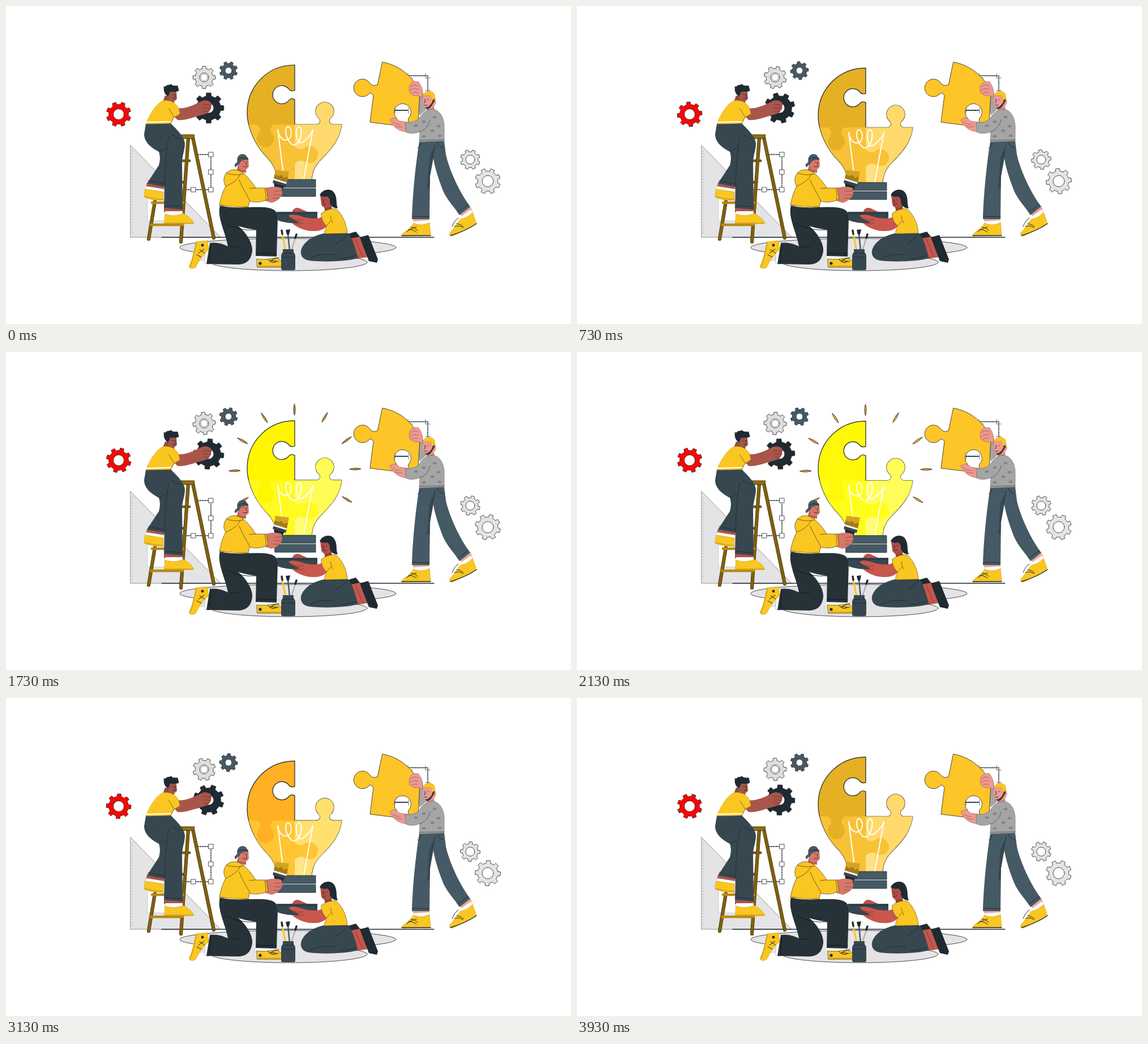
Recreate the animation shown at these times as an HTML page with a canvas. Size 998 by 561 pixels, loop 4 s.

```html
<!DOCTYPE html>
<html lang="en">
<head>
<meta charset="utf-8">
<title>Building an idea</title>
<style>
html, body { margin: 0; width: 100%; height: 100%; overflow: hidden; background: #fff; }
canvas { display: block; width: 100%; height: 100%; }
</style>
</head>
<body>
<canvas id="stage" width="998" height="561"></canvas>
<script>
const W = 998, H = 561, LOOP = 4000, STEP = 1000 / 15;
const stage = document.getElementById('stage').getContext('2d');
let g = stage;

const YELLOW = '#fac621', SHADE = '#d9a61c', DARK = '#37474f', SLATE = '#455a64',
  INK = '#1f2a32', NAVY = '#263238', LINE = '#222', WHITE = '#fff', PALE = '#e4e4e6';

function fill(d, color, edge, width = 0.8) {
  const p = new Path2D(d);
  g.fillStyle = color;
  g.fill(p);
  if (edge) { g.strokeStyle = edge; g.lineWidth = width; g.stroke(p); }
}

function line(d, color = LINE, width = 1, dash = []) {
  g.strokeStyle = color;
  g.lineWidth = width;
  g.setLineDash(dash);
  g.stroke(new Path2D(d));
  g.setLineDash([]);
}

function oval(x, y, rx, ry, color, edge) {
  g.beginPath();
  g.ellipse(x, y, rx, ry, 0, 0, Math.PI * 2);
  g.fillStyle = color;
  g.fill();
  if (edge) { g.strokeStyle = edge; g.lineWidth = 0.8; g.stroke(); }
}

function box(x, y, w, h, color, edge) {
  fill(`M${x} ${y}h${w}v${h}h${-w}Z`, color, edge);
}

function layer(draw) {
  const c = document.createElement('canvas');
  c.width = W;
  c.height = H;
  g = c.getContext('2d');
  g.lineCap = g.lineJoin = 'round';
  draw();
  g = stage;
  return c;
}

function gear(x, y, r, hole, color, angle) {
  const teeth = 8, root = r * 0.79, step = Math.PI * 2 / teeth;
  g.beginPath();
  for (let i = 0; i < teeth; i++) {
    const a = angle + i * step - Math.PI / 2;
    for (const [k, rad] of [[-0.28, root], [-0.19, r], [0.19, r], [0.28, root]]) {
      g.lineTo(x + Math.cos(a + k * step) * rad, y + Math.sin(a + k * step) * rad);
    }
    g.arc(x, y, root, a + 0.28 * step, a + 0.72 * step);
  }
  g.closePath();
  g.moveTo(x + hole, y);
  g.arc(x, y, hole, 0, Math.PI * 2);
  g.fillStyle = color;
  g.fill('evenodd');
  g.strokeStyle = LINE;
  g.lineWidth = 0.8;
  g.stroke();
}

function scenery() {
  oval(498, 426, 191, 16, PALE, LINE);
  oval(500, 452, 138, 15, PALE, LINE);
  box(340, 430, 270, 20, PALE);

  // set square
  fill('M220 246L379 408H220Z', PALE, '#555', 0.6);
  fill('M250 316V379H312Z', WHITE, '#aaa', 0.5);
  for (let y = 256; y < 406; y += 5) line(`M221 ${y}h3`, '#aaa', 0.6);
  line('M275 408H756', INK, 1.3);

  // selection frames
  line('M338 262H362V324H300', INK, 1.4, [2.5, 1.8]);
  for (const [x, y] of [[362, 262], [362, 293], [362, 324], [331, 324]]) box(x - 4, y - 4, 8, 8, WHITE, LINE);
  line('M712 123H745V153', INK, 1.4, [2, 1.6]);
  line('M710 119V127H718M741 119V127H749M741 149H749', '#666', 1);
}

function ladder() {
  const leg = (d, w) => { line(d, '#3b2c08', w + 1.2); line(d, '#80600f', w); };
  leg('M330 232L367 409', 5);
  leg('M308 273H324M306 311H317', 3.5);
  leg('M322 232L309 416', 5);
  leg('M263 345L252 411', 5);
  line('M258 347H313M256 386H312', '#b58916', 4.5);
  fill('M300 227H333L331 234H302Z', '#926d12', '#3b2c08');
}

function climber() {
  fill('M249 312L280 318L279 326L247 321Z', '#a9554a');
  fill('M248 318L279 323L278 331L246 325Z', WHITE);
  fill('M246 323L278 328L277 343C264 343 252 341 244 337Z', YELLOW, SHADE);
  line('M245 336Q260 341 277 341', SHADE, 2);
  fill('M279 356H312V364H279Z', '#a9554a');
  fill('M281 362H312V369H281Z', WHITE);
  fill('M281 367C293 372 306 369 313 366C322 371 331 377 331 384H280Z', YELLOW, SHADE);
  line('M280 383H331', SHADE, 2);
  fill('M247 208L291 207C300 216 316 231 316 243C316 254 311 264 311 277L312 359L279 356L280 319L249 313L270 281C273 270 272 264 270 257C256 250 244 240 244 226Z', DARK);
  line('M288 230C283 250 281 285 280 318M270 257L285 250M251 308L280 314M280 352L311 354M292 226Q302 232 309 234', INK, 0.8);

  fill('M302 180C315 182 330 176 345 168C352 165 362 167 363 173C363 183 358 190 350 191C335 195 315 203 303 201L297 195Z', '#a9554a');
  line('M348 174Q356 173 361 176M349 180Q356 179 362 181M350 186H358', '#70342d', 0.9);
  fill('M281 158L298 162L297 172L277 169Z', '#8f4a40');
  fill('M275 168C283 165 297 167 304 178L307 190L297 196L291 207L247 208C252 195 262 176 275 168Z', YELLOW, SHADE, 0.6);
  line('M297 196C293 189 289 184 288 181M291 207L297 196', '#7c5d10', 0.9);
  line('M248 205L291 204', WHITE, 1.8);
  fill('M283 149C284 144 300 145 301 152L302 163C300 169 292 169 287 166Z', '#a0564a');
  fill('M279 144L278 142L282 142C283 139 287 139 290 139L291 137L294 140C297 141 301 140 304 141C303 144 306 146 305 150C300 152 295 151 290 151L286 160L282 156C279 152 278 147 279 144Z', INK);
  line('M293 156h1M299 156h1M295 163q3 1 5-.5M297 156l2 4', INK, 1);
}

function painter() {
  // brush
  fill('M473 312L492 317L484 331H476Z', INK);
  fill('M473 304L496 311L494 319L471 312Z', DARK);
  fill('M473 304L496 311L495 314L472 307Z', WHITE);
  fill('M476 289L500 292L496 311L473 304Z', '#d3a322');
  fill('M475 297L481 300L486 298L491 303L498 301L496 311L473 304Z', '#a37c1b');

  // trailing foot
  fill('M353 416L362 418L358 456L351 454Z', WHITE, '#999', 0.5);
  fill('M336 416L356 414L358 430C346 440 340 451 335 461C329 465 322 463 324 458C331 444 332 430 336 416Z', YELLOW, SHADE);
  line('M336 418C333 434 330 447 325 460', SHADE, 2);
  line('M342 430l9 6m-11 0l10-7m-13 10l8 4', LINE, 1);
  oval(347, 422, 2.4, 2.4, INK);
  // leading foot
  fill('M441 440H478V446H441Z', WHITE);
  fill('M443 446C455 448 467 446 478 444L490 453V461H444Z', YELLOW, LINE, 0.6);
  line('M445 459H489', SHADE, 2);
  line('M463 447q7 8 14 4m-10-1q6-5 15-6m-13 5l12 2', INK, 1.1);
  oval(449, 454, 2.6, 2.6, INK);

  fill('M378 352C400 358 430 354 455 355C470 356 480 360 480 373L478 442L441 441L442 395C430 393 418 391 410 388C425 400 436 419 435 432C433 448 425 456 408 456L354 455L360 418C372 416 384 420 392 424C388 400 372 372 378 352Z', NAVY);
  line('M388 384Q410 397 442 395M443 436L478 437M362 421L359 453M394 424Q404 427 412 424', '#0f171b', 0.9);

  fill('M456 322C464 319 476 317 487 321L488 332C485 340 475 347 468 347L459 344Z', '#d6776b');
  line('M474 327L487 326M474 333H487M472 339H483', '#974a42', 0.9);
  fill('M410 280L424 284L424 294L407 293Z', '#bb6257');
  fill('M390 294C398 286 410 288 418 294C426 300 436 312 441 321L460 321L463 341C450 347 438 347 430 344L428 355L377 352C380 335 384 325 388 318C383 310 384 300 390 294Z', YELLOW, LINE, 0.6);
  line('M388 318C399 313 409 308 414 296M390 295C400 298 410 299 420 296M412 307C418 322 426 334 431 344M441 321L430 322M457 322Q460 332 459 343', '#7c5d10', 1);
  line('M379 350Q402 356 428 353', SHADE, 1.5);
  fill('M409 269C412 264 426 263 428 269L429 283C426 290 416 291 412 287Z', '#d6776b');
  fill('M409 275C407 264 415 259 423 263L428 271C420 270 414 272 412 278L405 284L404 280L408 276Z', SLATE, INK, 0.6);
  line('M411 270Q419 265 427 270', INK, 1);
  line('M420 275h1M426 275h1M419 283q4 2 7-.5M424 276l1 4', INK, 1);
}

function jar() {
  line('M488 402L494 432', YELLOW, 3);
  line('M487 396L488 402', INK, 3.5);
  line('M498 401L501 432', SLATE, 2.5);
  fill('M494 395L502 394L500 403H496Z', INK);
  line('M511 409L504 432', '#a8a8a8', 2);
  line('M513 403L511 409', INK, 3.5);
  fill('M489 429H508V435Q511 437 511 440V463Q511 466 508 466H489Q486 466 486 463V440Q486 437 489 435Z', DARK);
  line('M488 436H509M488 443H509', INK, 0.9);
}

function helper() {
  fill('M604 402L618 398L626 408L610 415Z', INK);
  fill('M604 411L625 407L639 443L619 446Z', '#c3574d');
  line('M617 411L630 443', '#843832', 0.9);
  fill('M625 408L640 404L657 447L655 453L641 450L632 427Z', INK);
  fill('M562 401L604 401C612 408 616 425 622 445C600 451 560 452 535 449C520 446 518 434 524 424C533 410 548 404 562 401Z', DARK);
  line('M538 445C550 438 565 437 580 439M604 402Q595 414 583 419M618 440Q602 446 588 445', INK, 0.9);

  fill('M505 364C508 356 514 355 519 357L532 363Z', '#bd5148');
  fill('M478 363H550V374C545 386 500 386 480 378Z', DARK);
  line('M480 366H549', INK, 0.9);
  fill('M499 370C510 364 525 374 535 374C545 375 552 376 560 371L571 380C568 391 558 397 545 397C528 398 512 390 504 382C510 384 515 383 519 381C511 379 504 375 499 370Z', '#c8574d');
  line('M504 375Q515 379 525 377M507 382Q516 386 525 383', '#843832', 0.9);
  fill('M561 350L575 350L576 362L564 364Z', '#96403a');
  fill('M557 366C565 359 575 357 583 358C595 368 602 385 603 401L563 402C562 395 566 392 566 388C560 382 556 375 557 366Z', YELLOW, LINE, 0.5);
  line('M566 388L574 379M573 370Q574 378 577 383', '#7c5d10', 0.9);
  fill('M555 334C560 327 574 331 575 339L573 353C568 358 559 357 557 350Z', '#af4d45');
  fill('M554 334C559 322 575 321 580 330C586 340 582 347 586 357C580 357 574 354 572 347C573 342 571 338 567 336Q560 338 554 334Z', INK);
  line('M559 342h1M565 342h1M560 350q3 1 5-1M561 343l-1 4', INK, 1);
}

function carrier() {
  fill('M719 374L748 375L747 382L719 382Z', '#f0a398');
  fill('M719 380L748 378V386L718 386Z', WHITE);
  fill('M720 383C730 388 740 386 748 382L750 405L699 406C698 400 713 396 720 383Z', YELLOW, SHADE);
  line('M699 405H750', INK, 1.5);
  line('M711 394q8 0 14 5m-10-9q8 1 12 6m-19 2q10-7 17-8', INK, 1);
  fill('M802 366L820 353L824 362L806 374Z', '#f0a398');
  fill('M804 371L821 359L825 365L807 378Z', WHITE);
  fill('M803 376C811 375 819 370 824 364L831 384L789 406C782 405 782 401 788 396Z', YELLOW, SHADE);
  line('M785 405Q812 397 831 384', INK, 1.4);
  line('M792 389q9-3 15 2m-11-7q9 1 12 6m-20-1q5-12 11-15', INK, 1);
  fill('M730 239L774 238L777 262C783 290 802 330 820 354L801 369C790 352 779 342 772 326C764 305 757 285 754 264L749 300L748 376L717 376C718 340 722 290 730 239Z', SLATE);
  fill('M748 268L754 252L755 268L749 300L748 322L744 322Z', DARK);
  line('M754 264L758 245M718 371L748 372M799 363L817 350M762 241Q764 248 773 250M733 242Q732 249 727 251', INK, 0.9);

  // raised arm
  fill('M724 148L735 148L741 183L731 192Z', '#a5a5a5', '#666', 0.6);
  fill('M665 99C695 104 720 125 731 152L728 207L712 206Q709 202 711 198A15 15 0 1 0 690 198Q691 205 683 210L643 205L649 158Q645 151 641 155A15.5 15.5 0 1 1 642 135Q647 143 656 139Z', '#fdc527', LINE, 0.8);
  line('M687 184H711', INK, 2, [2, 2]);
  line('M687 180V189M711 180V189', '#666', 1);
  fill('M712 145C712 136 721 131 729 134C736 144 737 153 735 162L729 158C723 160 717 157 713 153Z', '#ec9a91', '#9d5852', 0.6);
  line('M715 142Q722 137 728 141M714 149Q721 143 728 147M717 154Q722 150 727 153', '#9d5852', 0.8);
  fill('M678 201C684 195 690 197 695 203L710 205L707 222C698 221 685 217 678 201Z', '#ec9a91', '#9d5852', 0.6);
  line('M683 205Q690 210 697 209M687 211Q694 215 700 213', '#9d5852', 0.8);

  fill('M740 174L756 174L757 187L744 188Z', '#d88178');
  fill('M752 182C765 182 773 195 774 210V238L730 240L731 222C722 225 712 226 706 222L705 206C715 206 724 204 730 198C736 188 742 183 752 182Z', '#a5a5a5', '#666', 0.6);
  line('M731 222C740 219 747 211 749 201M730 237L774 236', '#555', 0.9);
  for (const [x, y] of [[738, 204], [757, 196], [764, 212], [753, 220], [738, 230], [766, 229], [724, 211]]) {
    oval(x, y, 3.5, 2.2, '#858585');
  }
  fill('M737 158L756 155L760 169C757 182 745 184 740 180L736 170Z', '#ec9a91');
  fill('M754 161L757 157L757 168L752 176C748 183 743 183 740 179Q748 179 753 169Z', '#453832');
  fill('M737 157C739 149 753 148 757 156L757 164L752 166L750 158Z', YELLOW, SHADE, 0.8);
  line('M739 165h1M745 165h1M739 175q3 1 5-.5M741 166l-2 5', INK, 1);
}

const glow = {
  at: [0, 1000, 1260, 1730, 2000, 2530, 3130, 3900, LOOP],
  left: ['e5b024', 'e5b024', 'ffb824', 'fff600', 'ffff00', 'ffe324', 'ffb024', 'e5b024', 'e5b024'],
  low: ['f7c236', 'f7c236', 'ffea2c', 'fffa20', 'ffff18', 'fffa22', 'ffc533', 'f7c236', 'f7c236'],
  right: ['ffd96b', 'ffd96b', 'fffb68', 'fffc55', 'ffff55', 'fff766', 'ffe06e', 'ffd96b', 'ffd96b']
};

function tone(name, t) {
  const { at } = glow, list = glow[name];
  let i = 0;
  while (t >= at[i + 1]) i++;
  const k = (t - at[i]) / (at[i + 1] - at[i]);
  const part = (hex, n) => parseInt(hex.substr(n * 2, 2), 16);
  return `rgb(${[0, 1, 2].map(n => Math.round(part(list[i], n) * (1 - k) + part(list[i + 1], n) * k))})`;
}

const rays = [[509.5, 74.5, 509.5, 94.5], [451, 90.5, 462, 107.5], [568, 89.5, 558, 106.5],
  [409, 134.5, 427, 144.5], [610, 132.5, 593, 144.5], [394, 192.5, 414, 192], [607, 189.5, 627, 189],
  [594, 238, 611, 248], [428, 239.5, 411, 249.5]];

function ray([x1, y1, x2, y2], color) {
  const len = Math.hypot(x2 - x1, y2 - y1), mx = (x1 + x2) / 2, my = (y1 + y2) / 2;
  const nx = (y1 - y2) / len * 3.2, ny = (x2 - x1) / len * 3.2;
  fill(`M${x1} ${y1}Q${mx + nx} ${my + ny} ${x2} ${y2}Q${mx - nx} ${my - ny} ${x1} ${y1}Z`, color, LINE, 0.9);
}

function bulb(t) {
  const left = tone('left', t), low = tone('low', t), right = tone('right', t);
  g.save();
  g.translate(0, 9 * (1 - Math.cos(t / LOOP * Math.PI * 2)));
  const light = 1 - Math.abs(t - 2000) / 1000;
  if (light > 0) {
    const k = Math.min(1, 0.1 + light);
    const color = `rgb(${[255, 185, 45].map(v => Math.round(v * k))})`;
    rays.forEach(r => ray(r, color));
  }
  fill('M510 104C463 104 426 141 426 188Q426 200 429 210C436 237 450 256 463 269C473 280 477 290 478 306H540C541 292 545 282 557 270C575 252 590 235 593 209H577Q569 207 572 199A16 16 0 1 0 554 199Q557 207 549 209H510V165Q503 162 500 166A16 16 0 1 1 500 147Q503 151 510 149Z', left, LINE, 1.2);
  fill('M429 209C436 237 450 256 463 269C473 280 477 290 478 306H511V209Z', low);
  fill('M510 209H549Q557 207 554 199A16 16 0 1 1 572 199Q569 207 577 209H593C590 235 575 252 557 270C545 282 541 292 540 306H510Z', right);
  fill('M443 209H473Q465 213 468 223A15 15 0 1 1 448 223Q451 213 443 209Z', left);
  fill('M510 248Q517 255 526 251A15 15 0 1 1 527 274Q518 270 510 278Z', low);
  fill('M511 278Q518 270 526 275L524 306H511Z', 'rgba(255,255,255,.2)');
  line('M491 305L480 218C482 232 489 238 497 236C507 233 505 213 498 213C491 214 493 234 505 244C517 250 524 226 521 216C518 209 511 216 513 228C514 240 520 245 527 238C534 232 540 226 542 218L526 305', WHITE, 2);
  box(475, 306, 72, 14, SLATE, INK);
  box(475, 322, 72, 14, SLATE, INK);
  g.restore();
}

const back = layer(() => { scenery(); ladder(); });
const front = layer(() => { climber(); painter(); helper(); jar(); carrier(); });

function draw(now) {
  const t = Math.floor((now % LOOP + 6.7) / STEP) * STEP % LOOP;
  const turn = t / LOOP * Math.PI / 2;
  g.fillStyle = WHITE;
  g.fillRect(0, 0, W, H);
  g.lineCap = g.lineJoin = 'round';
  g.drawImage(back, 0, 0);
  gear(199, 191, 22, 9.5, '#fb0505', turn + Math.PI / 8);
  gear(350, 126, 20, 8, '#dedede', turn);
  oval(350, 126, 6, 6, WHITE, '#777');
  gear(393, 114, 16, 6, SLATE, turn + Math.PI / 8);
  gear(358, 180, 27, 9, INK, -turn);
  gear(820, 271, 17.5, 8, PALE, turn + Math.PI / 8);
  gear(851, 309, 22.5, 10, PALE, turn + Math.PI / 8);
  bulb(t);
  g.drawImage(front, 0, 0);
}

const start = performance.now();
function tick() {
  draw(performance.now() - start);
  requestAnimationFrame(tick);
}
tick();
</script>
</body>
</html>
```
